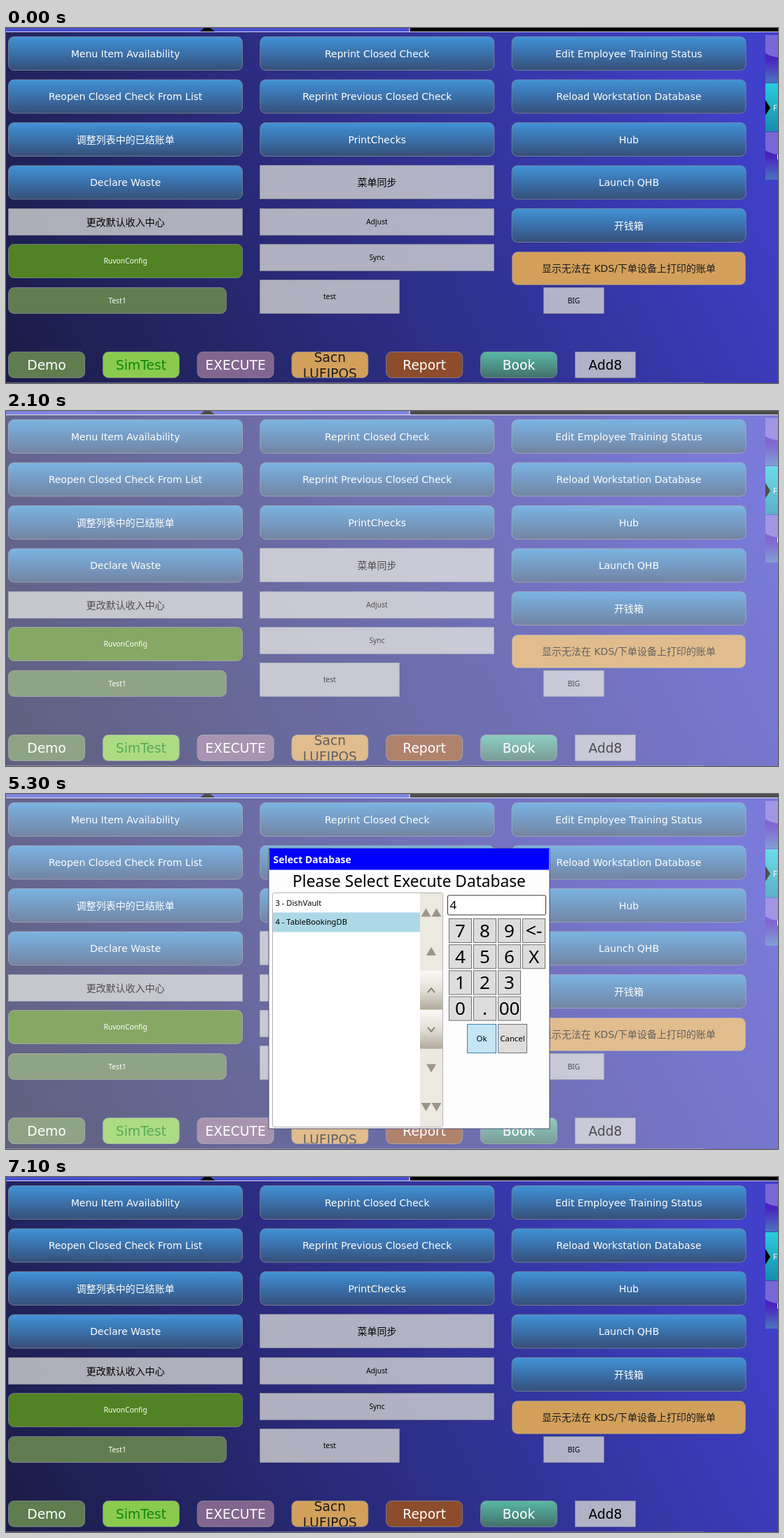
An HTML page for the animation above (8000 ms loop, 1102x508 px).

```html
<!DOCTYPE html>
<html lang="en">
<head>
<meta charset="utf-8">
<title>Till functions</title>
<style>
html, body { margin: 0; width: 100%; height: 100%; overflow: hidden; background: #2d2f85; }
svg { display: block; width: 1102px; height: 508px; }
text { font-family: "DejaVu Sans", "Noto Sans CJK SC", "Noto Sans CJK", sans-serif; text-anchor: middle; white-space: pre; }
.ui { font-family: "Noto Sans", "Open Sans", sans-serif; }
.left { text-anchor: start; }
.hot { fill: #c4e5f6; stroke: #3c7fb1; }
</style>
</head>
<body>
<svg id="stage" viewBox="0 0 1102 508" xmlns="http://www.w3.org/2000/svg"></svg>
<script>
const stage = document.getElementById('stage');

const rect = (x, y, w, h, fill, extra = '') =>
  `<rect x="${x}" y="${y}" width="${w}" height="${h}" fill="${fill}" ${extra}/>`;
const text = (s, x, y, size, fill = '#000', extra = '') =>
  `<text x="${x}" y="${y}" font-size="${size}" fill="${fill}" ${extra}>${s}</text>`;
const path = (d, fill, extra = '') => `<path d="${d}" fill="${fill}" ${extra}/>`;
const gradient = (id, ...stops) => `<linearGradient id="${id}" x2="0" y2="1">` +
  stops.map((c, i) => `<stop offset="${i / (stops.length - 1)}" stop-color="${c}"/>`).join('') +
  '</linearGradient>';

const BLUE = 'url(#blue)', GREY = 'rgba(211,211,211,.8)', ORANGE = '#d3a05c', MOSS = '#5f7d4f';
const UI = 'class="ui"', UI_LEFT = 'class="ui left"';

// A square grey tile or a rounded coloured button with a centred label
function button(label, x, y, w, h, fill, size = 14, ink = '#fff') {
  const round = fill === GREY ? 0 : 8;
  const small = size < 12;
  return rect(x + .5, y + .5, w - 1, h - 1, fill, `rx="${round}" stroke="#8a8f9a" stroke-opacity=".75"`) +
    text(label, x + w / 2, y + h / 2 + size * .36, size, ink, small ? UI : '');
}

function screen() {
  const cols = [
    ['Menu Item Availability', 'Reopen Closed Check From List', '调整列表中的已结账单', 'Declare Waste'],
    ['Reprint Closed Check', 'Reprint Previous Closed Check', 'PrintChecks'],
    ['Edit Employee Training Status', 'Reload Workstation Database', 'Hub', 'Launch QHB', '开钱箱']
  ];
  const grid = cols.map((labels, c) => labels.map((s, r) =>
    button(s, 3 + c * 359.3, 12 + r * 61.5, 335, 49, BLUE)).join('')).join('');

  const tab = y => rect(1084, y, 18, 68, 'url(#tab)') +
    path(`M1084 ${y}h18v32q-11 -1 -18 -6z`, '#7768d6');

  return rect(0, 0, 1102, 508, 'url(#back)') +
    rect(0, 0, 576, 5, '#4650d2') + rect(577, 0, 525, 5, '#000') +
    rect(0, 5, 1102, 1, '#d4d4e6') + rect(575.5, 0, 1, 6, '#e8e8f4') +
    path('M283 0h9l6 5h-21z', '#000') +
    rect(0, 507, 997, 1, '#8c8cb8', 'opacity=".6"') +
    tab(10) + rect(1084, 79, 18, 69, 'url(#cyan)') + path('M1084 103l7 11l-7 11z', '#000') +
    text('F', 1095, 118, 11, '#fff', UI_LEFT) + tab(149) + rect(1101, 181, 1, 7, '#fff') +
    grid +
    button('更改默认收入中心', 3, 258, 335, 39, GREY, 14, '#000') +
    button('RuvonConfig', 3, 309, 335, 49, '#518223', 10.3) +
    button('Test1', 3, 371, 312, 38, MOSS, 10.3) +
    button('菜单同步', 362, 196, 335, 49, GREY, 14, '#000') +
    button('Adjust', 362, 258, 335, 39, GREY, 10.3, '#000') +
    button('Sync', 362, 309, 335, 39, GREY, 10.3, '#000') +
    button('test', 362, 360, 200, 49, GREY, 10.3, '#000') +
    button('显示无法在 KDS/下单设备上打印的账单', 722, 320, 334, 48, ORANGE, 14, '#1c1c1c') +
    button('BIG', 767, 371, 87, 38, GREY, 10.3, '#000') +
    [['Demo', MOSS], ['SimTest', '#8acb4e', '#0c870c'], ['EXECUTE', '#82668f'], ['', ORANGE],
     ['Report', '#8d4c2c'], ['Book', 'url(#teal)']].map(([s, fill, ink], i) =>
      button(s, 3 + i * 134.8, 463, 110, 38, fill, 18.67, ink)).join('') +
    '<g clip-path="url(#slot)">' + text('Sacn', 462.4, 478, 18.67, '#1c1c1c') +
    text('LUFIPOS', 462.4, 500.5, 18.67, '#1c1c1c') + '</g>' +
    button('Add8', 812, 463, 87, 38, GREY, 18.67, '#000');
}

function key(label, x, y, w, h, size, id = '') {
  return rect(x + .5, y + .5, w - 1, h - 1, '#ddd', `stroke="#707070" ${id && `id="${id}"`}`) +
    text(label, x + w / 2, y + h / 2 + size * .36, size, '#000', UI);
}

function dialog() {
  const up = (x, y) => path(`M${x - 7} ${y + 6}h14l-7 -12z`, '#99958a');
  const down = (x, y) => path(`M${x - 7} ${y - 6}h14l-7 12z`, '#99958a');
  const chevron = (y, dir) => path(`M602 ${y + 3 * dir}l5 ${-6 * dir}l5 ${6 * dir}`, 'none',
    'stroke="#8a867a" stroke-width="2"');
  const rows = ['789', '456', '123', '0.'].map((s, r) => [...s].map((c, i) =>
    key(c, 632 + i * 35, 178 + r * 37.2, 33, 35, 26)).join('')).join('');

  return rect(375, 78, 401, 401, '#fdfdfd', 'stroke="#45456e"') +
    rect(376, 78, 399, 30.5, '#00f') +
    text('Select Database', 381.5, 98.5, 14, '#fff', UI_LEFT + ' font-weight="700"') +
    text('Please Select Execute Database', 575.5, 133, 22.7, '#000', UI) +
    rect(380.5, 141.5, 243, 335, '#fff', 'rx="2" stroke="#b4b4b4"') +
    rect(381, 142, 210, 28, '#add8e6', 'id="pick"') +
    text('3 - DishVault', 384.5, 159.5, 11.2, '#000', UI_LEFT) +
    text('4 - TableBookingDB', 384.5, 187, 11.2, '#000', UI_LEFT) +
    rect(591, 142, 32, 334, '#ece9e2') +
    rect(591, 253, 32, 55.5, 'url(#knob)') + rect(591, 309, 32, 55.5, 'url(#knob)') +
    up(599.5, 169.5) + up(614.5, 169.5) + up(607, 225) + chevron(281, 1) +
    chevron(337, -1) + down(607, 392.5) + down(599.5, 448) + down(614.5, 448) +
    rect(630.5, 145, 140, 28, '#fff', 'rx="2" stroke="#333"') +
    text('', 633.5, 165, 17, '#000', UI_LEFT + ' id="entry"') +
    rows + key('00', 702, 289.6, 33, 35, 26) +
    key('&lt;-', 737, 178, 33, 35, 27) + key('X', 737, 215.2, 33, 35, 26) +
    key('Ok', 658, 329, 42, 42, 11.3, 'accept') + key('Cancel', 702, 329, 42, 42, 11.3);
}

const message = () =>
  rect(0, 220, 390, 117.5, '#fff', 'id="frame" stroke="#77778c" stroke-width="1.5"') +
  text('', 575.5, 254, 22.8, '#000', UI + ' id="result"') +
  key('Ok', 534, 272, 84, 56, 11.3, 'confirm');

stage.innerHTML = '<defs>' +
  '<linearGradient id="back" gradientUnits="userSpaceOnUse" x1="0" y1="508" x2="1000" y2="0">' +
  '<stop stop-color="#1b1c46"/><stop offset=".5" stop-color="#2d2e86"/><stop offset="1" stop-color="#4040ca"/></linearGradient>' +
  gradient('blue', '#4193d6', '#3a70aa', '#364f78') +
  gradient('teal', '#5ab8a6', '#42706c') +
  gradient('cyan', '#2ccbdc', '#168cab') +
  gradient('tab', '#4a22c0', '#4a22c0', '#4a74c0') +
  gradient('knob', '#faf9f6', '#e2dfd6', '#b0aa9a') +
  '<clipPath id="slot"><rect x="408" y="463.5" width="109" height="36.5"/></clipPath></defs>' +
  screen() + rect(0, 0, 1102, 508, '#fff', 'id="veil"') +
  `<g id="dialog">${dialog()}</g><g id="message">${message()}</g>`;

const $ = id => document.getElementById(id);
const show = (id, on) => $(id).setAttribute('visibility', on ? 'visible' : 'hidden');

const runs = [
  { veil: 500, open: 700, pick: 1200, press: 1900, close: 2100, tell: 2200, confirm: 2800, end: 3000, clear: 3000,
    digit: '3', row: 142, width: 318, result: 'DishVault checks count 156' },
  { veil: 3700, open: 3700, pick: 4400, press: 5300, close: 5500, tell: 5600, confirm: 6800, end: 7000, clear: 7100,
    digit: '4', row: 169.5, width: 390, result: 'TableBookingDB checks count 238' }
];

function draw(now) {
  const t = now % 8000;
  const run = runs[t < 3700 ? 0 : 1];
  const picked = t >= run.pick;
  const open = t >= run.open && t < run.close;
  const veiled = t >= run.veil && t < run.clear;
  $('veil').setAttribute('opacity', veiled ? (t < 600 ? .15 : .3) : 0);
  show('dialog', open);
  show('pick', open && picked);
  $('pick').setAttribute('y', run.row);
  $('entry').textContent = picked ? run.digit : '';
  $('accept').classList.toggle('hot', t >= run.press);
  show('message', t >= run.tell && t < run.end);
  $('frame').setAttribute('width', run.width);
  $('frame').setAttribute('x', 575.8 - run.width / 2);
  $('result').textContent = run.result;
  $('confirm').classList.toggle('hot', t >= run.confirm);
  requestAnimationFrame(loop);
}

let start;
function loop(now) {
  start ??= now;
  draw(now - start);
}
requestAnimationFrame(loop);
</script>
</body>
</html>
```
